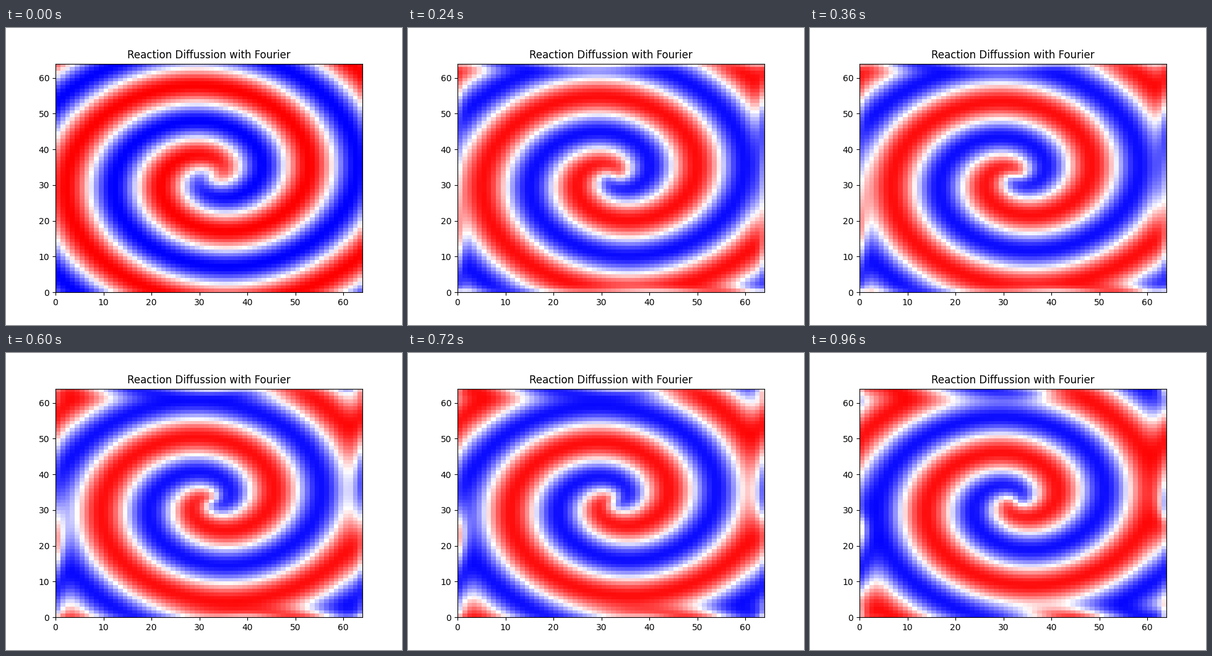
A matplotlib script for the animation above (1080 ms loop, 640 by 480 pixels).

```python
import numpy as np
import matplotlib.pyplot as plt
from matplotlib.animation import FuncAnimation

# Lambda-omega reaction-diffusion system on a periodic square
N = 64
SIZE = 20.0
DIFFUSION = 0.1
BETA = 1.0
FRAMES = 9
FRAME_TIME = 0.5
SUBSTEPS = 20

axis = -SIZE / 2 + SIZE / N * np.arange(N)
X, Y = np.meshgrid(axis, axis)
k = 2 * np.pi * np.fft.fftfreq(N, SIZE / N)
KX, KY = np.meshgrid(k, k)
K2 = KX**2 + KY**2


def rate(w):
    """Time derivative of w = u + iv, with the Laplacian taken spectrally."""
    a2 = np.abs(w) ** 2
    laplacian = np.fft.ifft2(-K2 * np.fft.fft2(w))
    return (1 - a2 - 1j * BETA * a2) * w + DIFFUSION * laplacian


def rk4(w, h):
    k1 = rate(w)
    k2 = rate(w + h / 2 * k1)
    k3 = rate(w + h / 2 * k2)
    k4 = rate(w + h * k3)
    return w + h / 6 * (k1 + 2 * k2 + 2 * k3 + k4)


def solve():
    r = np.hypot(X, Y)
    w = np.tanh(r) * np.exp(1j * (np.arctan2(Y, X) - r))
    states = [w.real]
    for _ in range(FRAMES - 1):
        for _ in range(SUBSTEPS):
            w = rk4(w, FRAME_TIME / SUBSTEPS)
        states.append(w.real)
    return states


states = solve()

fig, ax = plt.subplots(figsize=(6.4, 4.8), dpi=100)
mesh = ax.pcolormesh(states[0], cmap="bwr", vmin=-1, vmax=1)
ax.set_title("Reaction Diffussion with Fourier")


def update(i):
    mesh.set_array(states[i])
    return (mesh,)


anim = FuncAnimation(fig, update, frames=FRAMES, interval=120,
                     repeat=True, repeat_delay=0)
plt.show()
```
